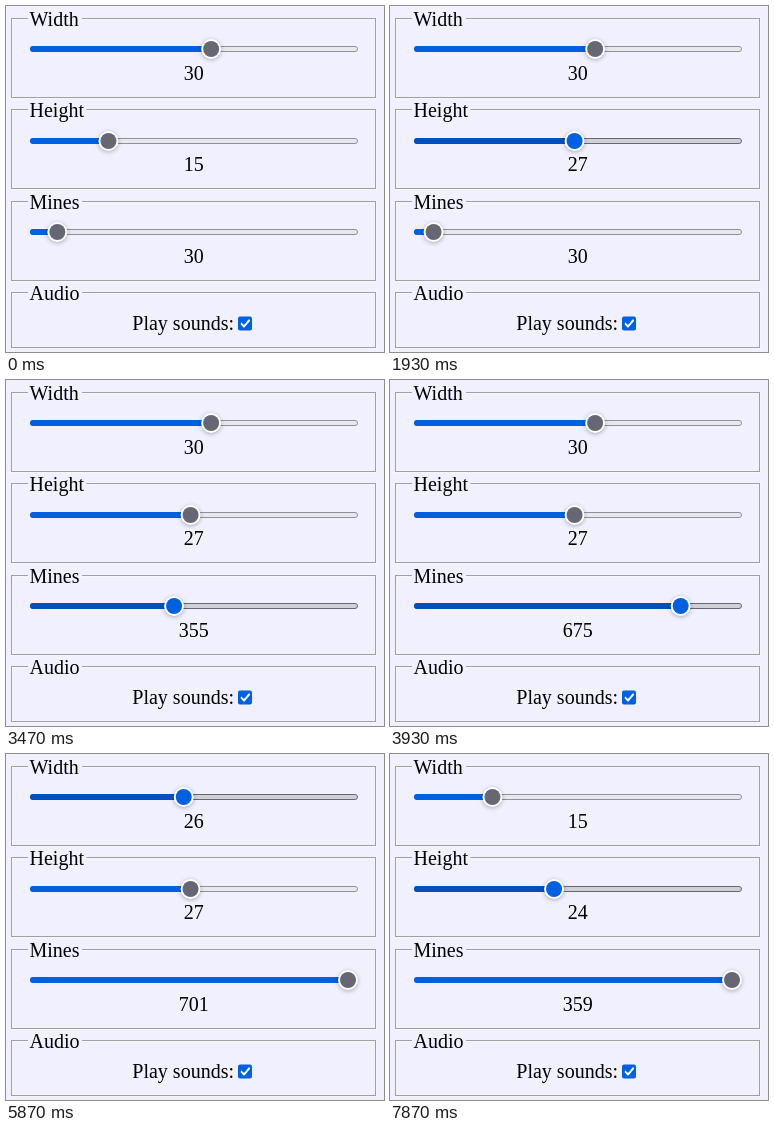
An HTML page that plays this animation: 378 px wide and 346 px high, repeating every 8000 ms.

```html
<!DOCTYPE html>
<html lang="en">
<head>
<meta charset="utf-8">
<title>Board settings</title>
<style>
html, body { margin: 0; width: 100%; height: 100%; overflow: hidden; background: #f0f0ff; }
svg { display: block; width: 378px; height: 346px; }
text { font: 20px "Liberation Serif", "Times New Roman", serif; fill: #000; }
.value { text-anchor: middle; }
.shadow { filter: drop-shadow(0 1px 2px rgba(0, 0, 0, .3)); }
</style>
</head>
<body>
<svg id="stage" viewBox="0 0 378 346"></svg>
<script>
const LOOP = 8000, FPS = 15;
const LEFT = 24, RIGHT = 352, THUMB = 10;
const ACCENT = '#0061e0';
const LOOKS = {
  idle:  { track: '#e9e9ed', edge: '#8f8f9d', fill: ACCENT, thumb: '#676774' },
  hover: { track: '#d0d0d7', edge: '#676774', fill: '#0250bb', thumb: '#484851' },
  press: { track: '#d0d0d7', edge: '#676774', fill: '#0250bb', thumb: ACCENT }
};
const stage = document.getElementById('stage');

function add(tag, attrs, text) {
  const el = document.createElementNS('http://www.w3.org/2000/svg', tag);
  set(el, attrs);
  if (text) el.textContent = text;
  return stage.appendChild(el);
}

function set(el, attrs) {
  for (const k in attrs) el.setAttribute(k, attrs[k]);
}

// Grooved frame with a gap for its legend
function fieldset(label, top, bottom, labelWidth) {
  const bar = (x, y, width, height, fill) => add('rect', { x, y, width, height, fill });
  const dark = '#a0a0a0', light = '#f6f6f8';
  const h = bottom - top;
  bar(6, top + 1, 364, 1, light);
  bar(6, top + 1, 1, h - 2, light);
  bar(5, bottom - 1, 366, 1, light);
  bar(370, top, 1, h, light);
  bar(5, top, 365, 1, dark);
  bar(5, top, 1, h - 1, dark);
  bar(6, bottom - 2, 364, 1, dark);
  bar(369, top + 1, 1, h - 2, dark);
  bar(22, top, labelWidth + 4, 2, '#f0f0ff');
  add('text', { x: 23.5, y: top + 8 }, label);
}

function slider(y, baseline) {
  const track = add('rect', { x: LEFT + .5, y: y - 2.5, width: RIGHT - LEFT - 1, height: 5, rx: 2.5 });
  const fill = add('rect', { x: LEFT, y: y - 3, height: 6, rx: 3 });
  const ring = add('circle', { cy: y, r: THUMB, fill: '#fff', class: 'shadow' });
  const thumb = add('circle', { cy: y, r: THUMB - 2 });
  const value = add('text', { x: 187.7, y: baseline, class: 'value' });
  return (v, max, mode) => {
    const look = LOOKS[mode];
    const x = LEFT + THUMB + (RIGHT - LEFT - 2 * THUMB) * (v - 5) / (max - 5);
    set(track, { fill: look.track, stroke: look.edge });
    set(fill, { width: x - LEFT, fill: look.fill });
    set(ring, { cx: x });
    set(thumb, { cx: x, fill: look.thumb });
    value.textContent = v;
  };
}

fieldset('Width', 12, 93, 50);
fieldset('Height', 103, 184, 54.4);
fieldset('Mines', 195, 276, 50);
fieldset('Audio', 286, 343, 50);
const show = {
  width: slider(43, 74),
  height: slider(135, 165),
  mines: slider(226, 257)
};
add('text', { x: 126.3, y: 324 }, 'Play sounds:');
add('rect', { x: 232, y: 310.5, width: 14, height: 14, rx: 2, fill: ACCENT });
add('path', {
  d: 'M-4.5 .5L-1.5 4H-.5L5-2.5L4.75-4H3.5L-.5 1L-1.5 1.25L-3.5-1Z',
  transform: 'translate(239 317.5)', fill: '#fff'
});

// Pointer states: [tick, slider, mode]
const modes = [
  [15, 'height', 'hover'], [19, 'height', 'press'], [32, 'height', 'hover'], [33, 'height', 'idle'],
  [35, 'mines', 'hover'], [45, 'mines', 'press'], [64, 'mines', 'hover'], [65, 'mines', 'idle'],
  [67, 'height', 'hover'], [68, 'height', 'idle'],
  [75, 'width', 'hover'], [79, 'width', 'press'], [102, 'width', 'hover'], [103, 'width', 'idle'],
  [110, 'height', 'hover'], [117, 'height', 'press']
];

// Drags: [first tick, ticks per value, slider, values]
const drags = [
  [20, 1, 'height', [16, 17, 18, 20, 21, 23, 24, 25, 26, 27]],
  [45, 1, 'mines', [35, 47, 68, 104, 156, 219, 287, 355, 417, 477, 532, 579, 620, 650, 675, 695, 710, 720]],
  [82, 2, 'width', [29, 28, 27]],
  [88, 1, 'width', [26, 25, 24, 23, 22, 21, 20, 19, 18, 17, 16]],
  [100, 1, 'width', [15]],
  [117, 1, 'height', [26, 24]]
];

function stateAt(tick) {
  const v = { width: 30, height: 15, mines: 30 };
  const mode = { width: 'idle', height: 'idle', mines: 'idle' };
  for (const [at, name, m] of modes) if (at <= tick) mode[name] = m;
  for (const [start, step, name, values] of drags) {
    if (start > tick) break;
    v[name] = values[Math.min(values.length - 1, Math.floor((tick - start) / step))];
  }
  const most = v.width * v.height - 1;
  v.mines = Math.min(v.mines, most);
  return { v, mode, max: { width: 50, height: 50, mines: most } };
}

// Ticks fall on hundredths of a second
const tickTime = n => Math.round(n * 100 / FPS) * 10;

function tickAt(ms) {
  const n = Math.ceil(ms * FPS / 1000);
  return tickTime(n) <= ms ? n : tickTime(n - 1) <= ms ? n - 1 : n - 2;
}

let last = -1;
function draw(ms) {
  const tick = tickAt(ms % LOOP);
  if (tick === last) return;
  last = tick;
  const { v, mode, max } = stateAt(tick);
  for (const name in show) show[name](v[name], max[name], mode[name]);
}

const begin = performance.now();
function loop() {
  draw(performance.now() - begin);
  requestAnimationFrame(loop);
}
draw(0);
requestAnimationFrame(loop);
</script>
</body>
</html>
```
